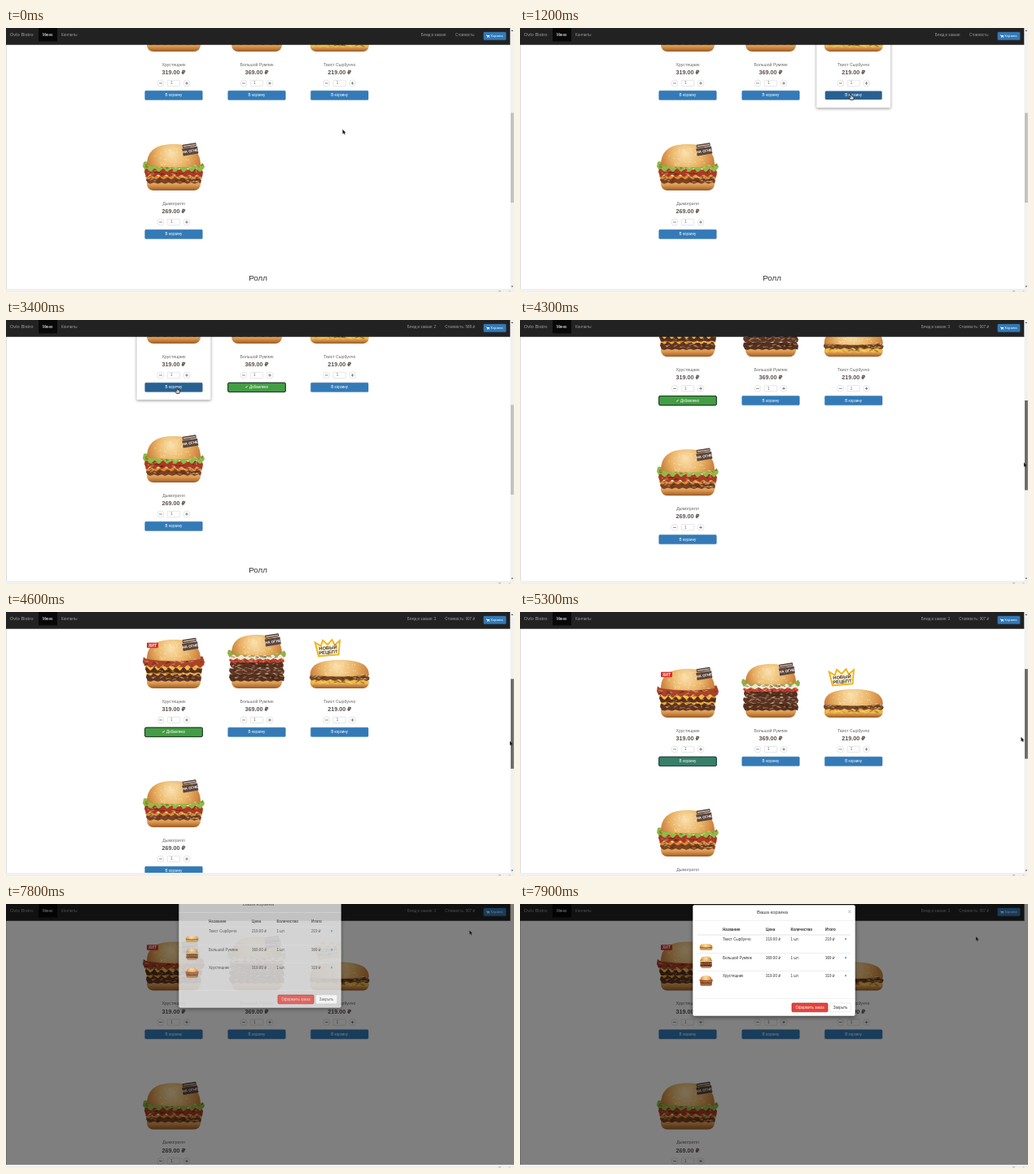
Write an HTML page with a canvas that moves like this. It is 624 by 325 pixels and loops after 8 s.

```html
<!DOCTYPE html>
<html lang="ru">
<head>
<meta charset="utf-8">
<title>Меню</title>
<style>
  html, body { margin: 0; width: 100%; height: 100%; overflow: hidden; background: #fff; }
  canvas { display: block; width: 624px; height: 325px; }
</style>
</head>
<body>
<canvas id="stage"></canvas>
<script>
const W = 624, H = 325, LOOP = 8000, TICK = 100;
const canvas = document.getElementById('stage');
const ctx = canvas.getContext('2d');
const dpr = Math.max(1, window.devicePixelRatio || 1);
canvas.width = W * dpr;
canvas.height = H * dpr;

const FONT = '"Liberation Sans", Arial, "DejaVu Sans", sans-serif';
const BODY = 4.55;
const BLUE = '#337ab7', DARK_BLUE = '#286090', GREEN = '#449d44';
const NAV_HEIGHT = 20.5, PAGE_WIDTH = 619.5;

// Layers: [top, height, half width, colour, waviness], measured from the bottom of the bun.
const RECIPES = {
  bacon: { top: -60, base: -36, w: 33, bun: 12, layers: [
    [-18, 9, 34, '#5f3422', .6], [-21, 4, 34, '#f0ab2c', 1.6], [-28, 9, 35, '#5a2f1e', .6],
    [-29, 5, 34, '#f4bb3c', 2], [-38, 11, 38, '#a9432a', 1.6]] },
  triple: { top: -66, base: -43, w: 31, bun: 12, layers: [
    [-18, 9, 34, '#55301f', .6], [-25, 7, 34, '#603826', .6], [-33, 8, 33, '#553121', .6],
    [-37, 5, 34, '#c9412f', .8], [-41, 5, 34, '#efe6da', 1], [-46, 6, 36, '#8db045', 1.6]] },
  long: { top: -35, base: -17, w: 36, bun: 9, layers: [
    [-11, 5, 36, '#eebc3f', 1], [-16, 6, 37, '#74452a', .7], [-19, 4, 36, '#a8763c', .9],
    [-20, 3, 35, '#eaddc2', .8]] },
  smoky: { top: -57, base: -31, w: 33, bun: 12, layers: [
    [-16, 7, 34, '#7a4123', .7], [-19, 4, 35, '#d88d33', 1.2], [-27, 9, 36, '#a93a23', 1.4],
    [-34, 9, 38, '#93b947', 2]] }
};

const CARDS = [
  { name: 'Хрустящник', price: 319, recipe: 'bacon', cx: 206, y: 45 },
  { name: 'Большой Румпик', price: 369, recipe: 'triple', cx: 308, y: 45 },
  { name: 'Твист Сырбунчо', price: 219, recipe: 'long', cx: 409.7, y: 45 },
  { name: 'Дымогрилл', price: 269, recipe: 'smoky', cx: 206, y: 216 }
];
const CLICKS = [{ card: 2, at: 1300 }, { card: 1, at: 2300 }, { card: 0, at: 3600 }];
const ADDED_TIME = 1600, FADE = 200;

// Keyframes: [time, values...]
const CURSOR = [
  [100, 413.5, 125], [300, 413.5, 127], [600, 411, 108], [1000, 406.5, 81.5], [1400, 406.5, 81.5],
  [1700, 362, 104], [2000, 311, 84], [2400, 309, 84], [2600, 285, 105], [2900, 216, 119],
  [3000, 212, 112], [3200, 210, 83.5], [3600, 210, 83.5], [3800, 228, 133], [4000, 540, 176],
  [4100, 619, 181], [4200, 619, 181], [4600, 619, 159], [4800, 618, 146], [5100, 617, 146],
  [5300, 615.5, 154], [5600, 615.5, 154], [6000, 575, 112], [6250, 543, 60], [6500, 597, 9.5],
  [7500, 597, 9.5], [7900, 560, 40]];
const SCROLL = [[4200, 0], [4600, 65], [4800, 104], [5000, 104], [5300, 101], [5400, 77.5]];

const clamp = v => Math.min(1, Math.max(0, v));

function track(keys, t) {
  if (t <= keys[0][0]) return keys[0].slice(1);
  const next = keys.findIndex(k => k[0] >= t);
  if (next < 0) return keys[keys.length - 1].slice(1);
  const a = keys[next - 1], b = keys[next], p = (t - a[0]) / (b[0] - a[0]);
  return a.slice(1).map((v, i) => v + (b[i + 1] - v) * p);
}

function rect(x, y, w, h, fill) {
  ctx.fillStyle = fill;
  ctx.fillRect(x, y, w, h);
}

function box(x, y, w, h, r, fill, stroke, line = .4) {
  ctx.beginPath();
  ctx.roundRect(x, y, w, h, r);
  ctx.fillStyle = fill;
  ctx.fill();
  if (stroke) { ctx.strokeStyle = stroke; ctx.lineWidth = line; ctx.stroke(); }
}

function shape(points, fill, stroke, line) {
  ctx.beginPath();
  points.forEach(([x, y]) => ctx.lineTo(x, y));
  ctx.closePath();
  if (fill) { ctx.fillStyle = fill; ctx.fill(); }
  if (stroke) { ctx.strokeStyle = stroke; ctx.lineWidth = line; ctx.stroke(); }
}

function ellipse(x, y, rx, ry, angle, fill) {
  ctx.beginPath();
  ctx.ellipse(x, y, rx, ry, angle, 0, 7);
  ctx.fillStyle = fill;
  ctx.fill();
}

// y is the middle of the capital letters
function text(str, x, y, size, color, align = 'left', weight = 400) {
  ctx.font = `${weight} ${size}px ${FONT}`;
  ctx.textAlign = align;
  ctx.fillStyle = color;
  ctx.fillText(str, x, y + size * .32);
}

function at(x, y, draw, scale = 1, angle = 0) {
  ctx.save();
  ctx.translate(x, y);
  ctx.rotate(angle);
  ctx.scale(scale, scale);
  draw();
  ctx.restore();
}

function gradient(g, ...colors) {
  colors.forEach((c, i) => g.addColorStop(i / (colors.length - 1), c));
  return g;
}

const noise = n => { const v = Math.sin(n * 12.9898) * 43758.5453; return v - Math.floor(v); };

function band([top, height, half, color, wave]) {
  const points = [];
  const round = p => half * (.94 + .06 * Math.sin(p * Math.PI));
  for (let x = -1; x <= 1; x += .04) points.push([x * round(.2), top + wave * Math.sin(x * 19 + top)]);
  points.push([half, top + height / 2]);
  for (let x = 1; x >= -1; x -= .04) points.push([x * round(.2), top + height + wave * Math.sin(x * 23 + half)]);
  points.push([-half, top + height / 2]);
  shape(points, color);
  for (let i = 0; i < 26; i++) {
    const seed = i * 3 + top * 7;
    ellipse((noise(seed) * 2 - 1) * (half - 3), top + height * (.2 + .6 * noise(seed + 1)),
      1 + 2 * noise(seed + 2), .8, noise(seed + 4) - .5, i % 2 ? 'rgba(255,225,160,.35)' : 'rgba(50,15,0,.35)');
  }
}

function burger(name, x, bottom, scale = 1) {
  const { top, base, w, bun, layers } = RECIPES[name];
  const height = base - top;
  at(x, bottom, () => {
    box(-w, -bun, w * 2, bun, [2, 2, 8, 8],
      gradient(ctx.createLinearGradient(0, -bun, 0, 0), '#efc27c', '#d9954a', '#9c5c2a'));
    layers.forEach(band);
    ctx.beginPath();
    ctx.moveTo(-w, base);
    ctx.bezierCurveTo(-w, base - height * .75, -w * .6, top, 0, top);
    ctx.bezierCurveTo(w * .6, top, w, base - height * .75, w, base);
    ctx.quadraticCurveTo(0, base + 5, -w, base);
    ctx.fillStyle = gradient(ctx.createRadialGradient(-w * .1, top + height * .45, 2, 0, top + height * .5, w * 1.05),
      '#f9dca6', '#eab669', '#c97b38');
    ctx.fill();
    for (let i = 0; i < 40; i++) {
      const angle = noise(i) * Math.PI, r = Math.sqrt(noise(i + 90)) * .85;
      ellipse(Math.cos(angle) * w * r, base - Math.sin(angle) * height * r, .8, .5, angle, 'rgba(255,240,205,.65)');
    }
  }, scale);
}

function grillBadge(x, y) {
  at(x, y, () => {
    box(-8.5, -7, 17, 4, .5, '#5b463c');
    box(-9.5, -2.4, 19, 9, .5, '#5b463c');
    rect(-7.5, -5.4, 15, 1, '#e4dcd6');
    text('НА ОГНЕ', 0, 2.2, 4.4, '#fff', 'center', 700);
  }, 1, -.16);
}

function crownBadge(x, y) {
  at(x, y, () => {
    shape([[-13, 10], [-16, -8], [-9, -3], [-6, -10], [0, -4], [6, -10], [9, -3], [16, -8], [13, 10]],
      '#fff8dc', '#ecb521', 2);
    text('НОВЫЙ', 0, .3, 6, '#3f2b20', 'center', 700);
    text('РЕЦЕПТ', 0, 6, 6, '#3f2b20', 'center', 700);
  }, .95, -.08);
}

function hitBadge(x, y) {
  box(x - 7, y - 3.3, 14, 6.6, 1, '#d5302c');
  text('ХИТ', x, y, 5, '#fff', 'center', 700);
}

function roundButton(x, y, sign) {
  box(x - 4, y - 4, 8, 8, 4, '#fff', '#ccc', .5);
  rect(x - 1.9, y - .3, 3.8, .6, '#444');
  if (sign === '+') rect(x - .3, y - 1.9, .6, 3.8, '#444');
}

function hovers([px, py], x, y, w, h) {
  return px >= x && px <= x + w && py >= y && py <= y + h;
}

function buyButton(card, index, t, pointer) {
  const { cx, y } = card;
  const click = CLICKS.find(c => c.card === index);
  const since = click ? t - click.at : -1;
  const added = since >= 0 && since < ADDED_TIME;
  const latest = CLICKS.filter(c => c.at <= t).pop();
  const focused = latest && latest.card === index && t < 7600;
  const over = hovers(pointer, cx - 35, y + 32.5, 70, 11);
  const inset = click && since >= -100 && since < 0 ? .5 : 0;
  const draw = (fill, edge, line) =>
    box(cx - 35.3 + inset, y + 32.3 + inset, 70.6 - inset * 2, 11.3 - inset * 2, 1.3, fill, edge, line);

  draw(over || focused ? DARK_BLUE : BLUE, focused ? '#142f49' : '#2e6da4', focused ? 1 : .4);
  const green = since < 0 ? 0 : clamp(1 - (since - ADDED_TIME) / FADE);
  if (green) {
    ctx.globalAlpha = green;
    draw(GREEN, '#1c3d20', 1);
    ctx.globalAlpha = 1;
  }
  text(added ? '✔ Добавлено' : 'В корзину', cx, y + 38, BODY, '#fff', 'center');
}

function drawCard(card, index, t, pointer) {
  const { cx, y } = card;
  if (hovers(pointer, cx - 46, y - 90, 92, 143)) {
    ctx.save();
    ctx.shadowColor = 'rgba(0,0,0,.45)';
    ctx.shadowBlur = 3.5 * dpr;
    ctx.shadowOffsetY = dpr;
    box(cx - 45.5, y - 90, 91, 143.3, 1, '#fff');
    ctx.restore();
  }
  burger(card.recipe, cx, y - 16);
  text(card.name, cx, y, 5.2, '#666', 'center');
  text(card.price + '.00 ₽', cx, y + 9.8, 7.2, '#5a504d', 'center', 700);
  roundButton(cx - 16, y + 23, '-');
  roundButton(cx + 16, y + 23, '+');
  box(cx - 7.7, y + 19.3, 15.4, 7.4, 1, '#fff', '#ccc', .5);
  text('1', cx - 4, y + 23, BODY, '#666');
  buyButton(card, index, t, pointer);
}

function drawPage(t, scroll, [px, py]) {
  const pointer = [px, py - scroll];
  ctx.save();
  ctx.beginPath();
  ctx.rect(0, 20, PAGE_WIDTH, 301);
  ctx.clip();
  ctx.translate(0, scroll);
  CARDS.forEach((card, i) => drawCard(card, i, t, pointer));
  grillBadge(226, -25);
  grillBadge(327.5, -30.5);
  grillBadge(226, 149.5);
  hitBadge(180, -24);
  crownBadge(395.5, -21);
  text('Ролл', 309.5, 308, 9.75, '#333', 'center');
  ctx.restore();
  rect(0, 20, 1, 301, '#dcdcdc');
}

function drawCart(x, y) {
  shape([[x, y - 1.6], [x + .9, y - 1.6], [x + 1.1, y - 1.1], [x + 4, y - 1.1], [x + 3.6, y + .7], [x + 1.2, y + .7]], '#fff');
  rect(x + 1.2, y + 1.1, .8, .8, '#fff');
  rect(x + 2.9, y + 1.1, .8, .8, '#fff');
}

function drawNav(t, pointer) {
  const grey = '#9d9d9d';
  const bought = CLICKS.filter(c => c.at <= t);
  const sum = bought.reduce((s, c) => s + CARDS[c.card].price, 0);
  rect(0, 0, PAGE_WIDTH, NAV_HEIGHT, '#222');
  rect(0, NAV_HEIGHT - .4, PAGE_WIDTH, .4, '#080808');
  rect(40, 0, 23, 16.5, '#080808');
  text('Ovlo Bistro', 4.8, 8.2, 5.85, grey);
  text('Меню', 45, 8.2, BODY, '#fff');
  text('Контакты', 68, 8.2, BODY, grey);
  text('Блюд в заказе: ' + (bought.length || ''), sum ? 492.8 : 509.8, 8.2, BODY, grey);
  text('Стоимость: ' + (sum ? sum + ' ₽' : ''), sum ? 539.2 : 552, 8.2, BODY, grey);
  const over = hovers(pointer, 587, 5, 27, 10);
  box(586.7, 5.1, 27.5, 9.7, 1, over ? DARK_BLUE : BLUE, over ? '#204d74' : '#2e6da4');
  drawCart(590, 10);
  text('Корзина', 595.6, 10, 3.9, '#fff');
}

function drawScrollbar(scroll, dragged) {
  rect(PAGE_WIDTH, 0, W - PAGE_WIDTH, 321, '#f1f1f1');
  shape([[620.5, 4], [621.8, 2.2], [623.1, 4]], '#555');
  shape([[620.5, 317.5], [621.8, 319.3], [623.1, 317.5]], '#555');
  rect(620, 104.5 - scroll * .34, 3.8, 110.5, dragged ? '#6b6b6b' : '#c1c1c1');
}

function drawModal(t) {
  rect(0, 0, W, 321, `rgba(0,0,0,${.5 * clamp((t - 7550) / 200)})`);
  const shown = clamp((t - 7650) / 200);
  if (!shown) return;
  const dark = '#333', line = y => rect(218, y, 188, .5, '#ddd');
  ctx.save();
  ctx.globalAlpha = shown;
  ctx.translate(0, -Math.max(0, (7900 - t) * .1));
  ctx.shadowColor = 'rgba(0,0,0,.5)';
  ctx.shadowBlur = 5 * dpr;
  ctx.shadowOffsetY = 1.6 * dpr;
  box(212.3, 1.3, 199.4, 136.4, 2, '#fff');
  ctx.shadowColor = 'transparent';
  text('Ваша корзина', 310, 10.2, 5.85, dark, 'center');
  text('×', 404.8, 9.5, 7, '#bbb', 'center', 700);
  rect(212.3, 20, 199.4, .5, '#e5e5e5');
  rect(212.3, 116.2, 199.4, .5, '#e5e5e5');

  const columns = [249, 302, 332.5, 375];
  const row = (cells, y, weight) => cells.forEach((c, i) => text(c, columns[i], y, BODY, dark, 'left', weight));
  row(['Название', 'Цена', 'Количество', 'Итого'], 31.2, 700);
  rect(218, 37.6, 188, .8, '#ddd');
  CLICKS.forEach(({ card }, i) => {
    const { name, price, recipe } = CARDS[card], y = 44 + i * 22.3;
    row([name, price + '.00 ₽', '1 шт.', price + ' ₽'], y, 400);
    text('×', 400, y, BODY, BLUE, 'center', 700);
    burger(recipe, 228.6, y + 12.5, .215);
    if (i) line(y - 6.2);
  });
  box(334, 122, 44, 10.8, 1.3, '#e2443d', '#a92c28', .7);
  text('Оформить заказ', 356, 127.3, BODY, '#fff', 'center');
  box(380.6, 122, 26, 10.8, 1.3, '#fff', '#ccc');
  text('Закрыть', 393.6, 127.3, BODY, dark, 'center');
  ctx.restore();
}

function drawCursor(x, y, hand) {
  at(x, y, () => {
    if (hand) {
      shape([[-.7, 0], [.6, 0], [.8, 2.4], [3.4, 3], [3.6, 5], [2.8, 7], [-.6, 7], [-2.4, 4.3], [-1.7, 3.6], [-.7, 4.3]],
        '#ccc', '#222', .8);
    } else {
      shape([[0, 0], [0, 5.2], [1.2, 4.2], [2, 6], [3, 5.5], [2.3, 3.8], [3.8, 3.7]], '#111', '#777', .4);
    }
  });
}

function overButton([x, y], scroll) {
  return hovers([x, y], 587, 5, 27, 10) ||
    CARDS.some(c => hovers([x, y - scroll], c.cx - 35, c.y + 32.5, 70, 11));
}

function render(t) {
  ctx.setTransform(dpr, 0, 0, dpr, 0, 0);
  rect(0, 0, W, H, '#fff');
  const pointer = track(CURSOR, t), [scroll] = track(SCROLL, t);
  const modal = t >= 7600;
  drawPage(t, scroll, pointer);
  drawNav(t, modal ? [-1, -1] : pointer);
  if (modal) drawModal(t);
  else drawScrollbar(scroll, t >= 4300 && t < 5800);
  rect(0, 321, W, 4, '#f0f0f0');
  rect(605, 323.5, 3, .8, '#999');
  rect(617.5, 323.5, 2, .8, '#bbb');
  drawCursor(...pointer, !modal && overButton(pointer, scroll));
}

function loop() {
  const t = performance.now() % LOOP;
  render(Math.floor(t / TICK) * TICK);
  requestAnimationFrame(loop);
}
loop();
</script>
</body>
</html>
```
